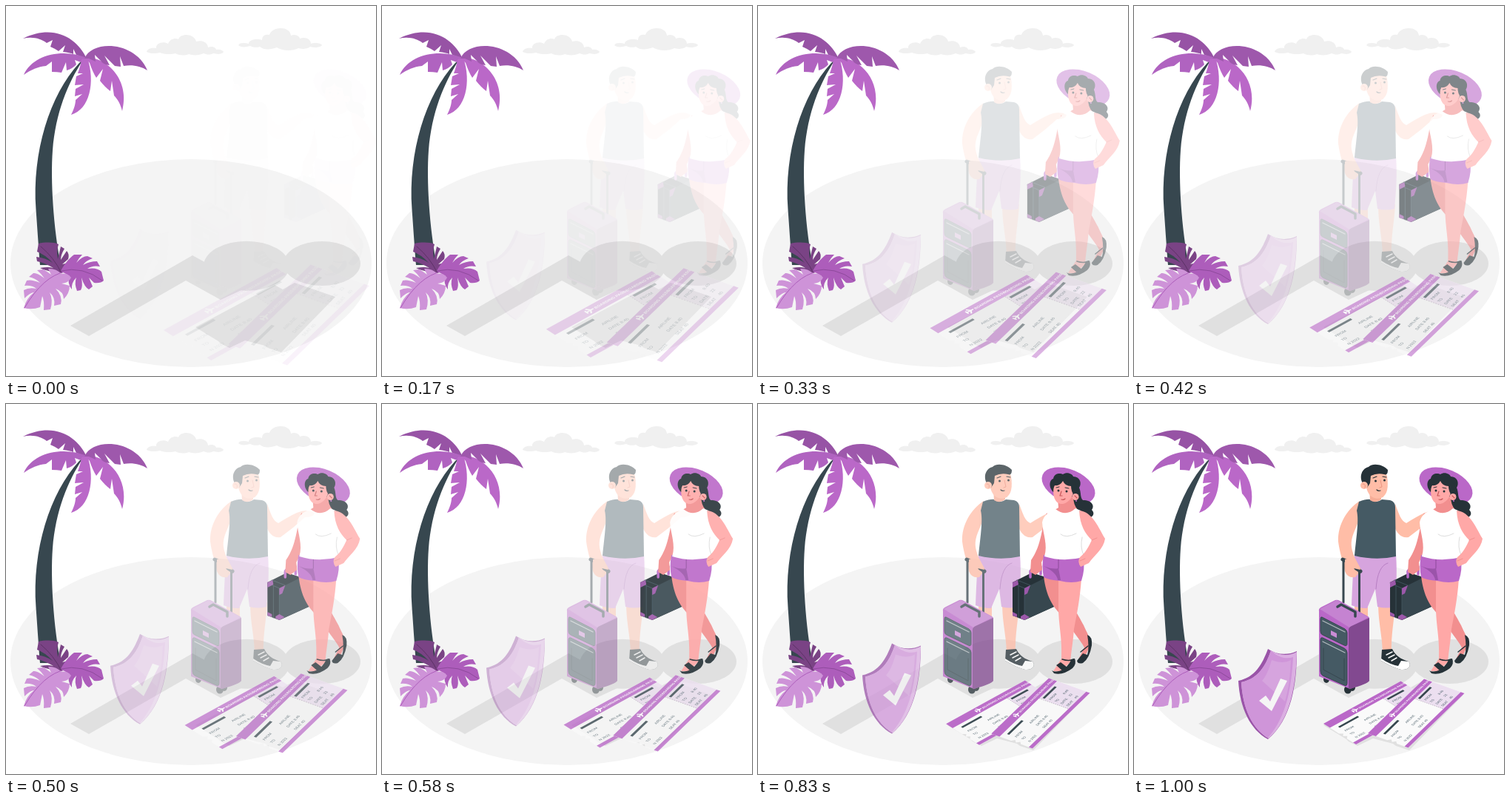
Write an HTML page that moves like this. It is 500 px wide and 500 px high and loops after 1.04 s.

```html
<!DOCTYPE html>
<html lang="en">
<head>
<meta charset="utf-8">
<title>Travel insurance</title>
<style>
html, body { margin: 0; width: 100%; height: 100%; overflow: hidden; background: #fff; }
svg { display: block; width: 100%; height: 100%; }
text { font-family: "Liberation Sans", Arial, sans-serif; }
.line { fill: none; stroke-linecap: round; stroke-linejoin: round; }
</style>
</head>
<body>
<svg viewBox="0 0 500 500">
<defs>
  <g id="ticket">
    <path fill="#fafafa" d="M0 0H100V50H0V36L3 33L0 30L3 27L0 24Z"/>
    <path fill="#ecdff0" d="M69 9H100V46H69Z"/>
    <path fill="#ba68c8" d="M0 0H100V10H0ZM0 45.5H100V50H0Z"/>
    <path class="line" stroke="#fff" stroke-width="1.3" d="M34 5H40M36 2L38 5L36 8M34 3.5V6.5"/>
    <g fill="#fff" font-size="3.5" font-weight="700">
      <text x="41.5" y="6.5">BOARDING PASS</text>
      <text x="71" y="6.5">BOARDING PASS</text>
    </g>
    <path stroke="#37474f" stroke-width="2.6" d="M7 15.5H32M71 14H92"/>
    <path stroke="#b0a4b4" stroke-width=".6" stroke-dasharray="1.2 1.2" d="M69 10V45"/>
    <g fill="#455a64" font-size="3.8">
      <text x="7" y="26">FROM</text><text x="32" y="26">AIRLINE</text>
      <text x="7" y="34">TO</text><text x="32" y="34">DATE 8:40</text>
      <text x="7" y="42">N 2022</text><text x="32" y="42">SEAT 40</text>
      <text x="72" y="22">FROM</text><text x="72" y="29">TO</text><text x="86" y="29">8:40</text>
      <text x="72" y="36">DATE</text><text x="86" y="36">22</text>
      <text x="72" y="43">SEAT</text><text x="86" y="43">40</text>
    </g>
  </g>
</defs>

<ellipse cx="250" cy="347.5" rx="244" ry="140.5" fill="#f4f4f4"/>
<g fill="#f0f0f0">
  <path d="M190 62C191 57 198 56 203 57C202 50 213 47 219 51C222 44 229 43 233 45C235 37 254 36 257 48C264 46 272 48 273 56C280 53 284 57 284 59C289 58 293 60 294 62C291 66 285 65 280 64C275 67 270 65 267 64C261 67 252 67 247 65C240 68 232 66 229 64C222 66 212 65 208 63C200 65 194 64 190 62Z"/>
  <path d="M314 53C316 49 323 50 328 51C328 45 340 44 346 46C346 39 352 38 356 39C360 27 384 27 385 40C391 37 397 41 397 44C405 41 412 45 412 51C417 49 426 50 427 53C425 56 417 57 411 55C406 59 398 58 395 57C388 61 374 61 366 56C358 59 349 60 343 55C337 57 332 55 330 54C323 56 317 56 314 53Z"/>
</g>
<g fill="#e0e0e0">
  <path d="M87 432L252 337L272 348L318 384L290 397L243 371L112 446Z"/>
  <ellipse cx="325" cy="351.3" rx="58" ry="33.5"/>
  <ellipse cx="427" cy="348" rx="52" ry="30"/>
  <path d="M256 434L363 377L374 383L390 374L445 393L372 468L354 462L350 459L323 452L302 462L290 456L287 453Z"/>
</g>

<g id="palm">
  <path fill="#37474f" d="M99 77C59 120 35 198 40.500 275C42 295 43 312 46 350L74 350C64 300 60 235 63 195C67 145 83 105 104 73Z"/>
  <path fill="#9753a5" d="M109 71C97 45 66 23 23 44C36 41 47 44 55 50L63 46L60 55Q67 58 71 61L80 53L77 62Q86 63 91 65L91 58L95 66Z"/>
  <path fill="#b063c0" d="M109 70C78 57 36 65 24 93C34 86 43 82 54 81L62 75L62 89Q69 89 75 90L81 76L82 87Q91 84 95 79L93 73L101 76Z"/>
  <path fill="#ba68c8" d="M106 69C138 69 168 101 157 142C155 133 151 126 146 121L143 101L141 115Q134 110 127 101L131 85L122 97Q117 89 113 77Z"/>
  <path fill="#ba68c8" d="M110 70C121 103 113 140 88 147C92 139 94 132 94 127L103 119L93 122L94 112L105 106L93 107L95 95L104 91L97 91Q101 80 102 72Z"/>
  <path fill="#9e58ac" d="M106 71C117 45 175 48 191 87C182 81 170 79 159 81L154 68L155 82L147 81L133 67L140 80Q132 80 127 73L120 66L121 75L112 71Z"/>
</g>
<g id="leaves">
  <path fill="#7a4385" d="M75 361C67 360 54 358 46 354Q57 352 64 354Q52 347 42 345L41 339Q53 340 63 347Q53 336 42 332L44 321C53 319 65 319 71 322Q68 330 70 342Q72 334 74 325L79 328Q74 336 74 343L82 331Q86 335 84 342L76 349L84 347Q82 356 75 361Z"/>
  <path class="line" stroke="#5d3266" d="M47 325Q65 340 75 361"/>
  <path fill="#ad5dbb" d="M74 358C78 350 85 341 92 336L103 336Q98 341 95 347Q103 338 110 338L117 341Q108 344 104 350Q113 345 123 345L127 352Q117 350 110 355Q123 353 129 359L132 371Q128 375 119 374L112 367L117 379L112 383Q106 380 102 367Q104 380 101 384L96 385Q92 375 95 367Q88 374 89 383Q82 374 86 365Z"/>
  <path class="line" stroke="#8e4a9c" d="M74 358Q104 351 130 371"/>
  <path fill="#ce93d8" d="M75 362Q67 354 57 355L61 363Q53 357 50 356L42 357Q48 362 52 368Q42 360 37 361L31 366Q40 368 46 374Q34 369 28 371L25 378Q35 377 41 382Q31 380 24 384L25 395Q33 387 38 387Q28 394 24 408Q35 411 46 407L49 392Q52 398 51 411L60 410Q64 397 59 387Q67 394 65 405L74 403Q77 392 67 382Q78 386 78 396Q86 388 86 378L75 375Q85 374 88 367Q82 360 75 362Z"/>
  <path class="line" stroke="#ad5dbb" d="M80 359Q50 365 25 408"/>
</g>

<g id="shield">
  <path fill="#9a54a8" d="M141 374C164 369 173 352 181 331C193 339 207 340 220 334C220 378 213 426 181 453C157 440 143 411 141 374Z"/>
  <path fill="#dbafe2" d="M145 376C168 371 178 354 185 333C196 340 209 341 220 335C219 378 212 426 182 452C160 439 147 412 145 376Z"/>
  <path fill="#cf95d9" d="M145 376C168 371 178 354 185 333C195 343 206 345 215 342C213 380 207 422 181 451C160 439 147 412 145 376Z"/>
  <path fill="#d6a4de" d="M186 346C196 350 205 350 212 346C211 367 209 386 204 402L173 374C180 366 183 356 186 346Z"/>
  <path fill="#f5f5f5" d="M169 401L178 394L184 402L198 371L207 374L186 415Z"/>
</g>

<g id="man">
  <path fill="#ffbda7" d="M298 260H316V300H298ZM330 268L353 268C352 292 347 311 348 337L336 339C336 314 330 297 330 268Z"/>
  <path fill="#263238" d="M335 332L349 331C353 340 361 345 371 348C376 354 370 360 361 359C349 356 340 350 334 347Z"/>
  <path fill="#fff" d="M361 347L371 348C376 354 370 360 361 359C349 356 340 350 334 347L334 344Q346 352 357 354Z"/>
  <path class="line" stroke="#fff" stroke-width="1.5" d="M341 339L349 335M344 343L352 339M348 347L355 343"/>
  <path fill="#d6a4de" d="M298 203H354C356 230 354 252 352 274Q341 277 329 274L326 250L315 276Q303 276 294 272C295 247 296 225 298 203Z"/>
  <path class="line" stroke="#b77fc3" d="M343 215Q329 219 327 250"/>
  <path fill="#ffbda7" d="M353 135C358 149 361 158 368 161Q382 152 393 147Q407 141 417 147Q416 153 404 153Q388 168 371 180C361 182 355 174 352 166Z"/>
  <path fill="#ffbda7" d="M305 131C288 142 275 163 276 186C278 202 283 214 285 226Q289 236 299 234L307 224L298 207C293 194 292 187 297 174L304 157Z"/>
  <path fill="#455a64" d="M304 132Q314 128 320 129Q327 135 335 129L346 130Q353 132 353 139L354 206Q327 212 298 205C301 176 304 157 301 144Z"/>
  <path fill="#f6ad97" d="M318 114H334V129Q327 135 319 130Z"/>
  <path fill="#ffbda7" d="M314 101C316 91 340 86 342 98C344 111 343 123 334 127C322 130 316 122 314 113Z"/>
  <path fill="#263238" d="M309 107C304 98 308 87 317 85C323 79 337 82 343 89Q343 97 338 95Q328 93 320 97L319 107L315 113Z"/>
  <circle cx="311" cy="110" r="5" fill="#ffbda7"/>
  <path class="line" stroke="#eb9481" d="M309 108Q314 108 312 113M333 103L335 112L332 113"/>
  <g fill="#263238"><circle cx="326.5" cy="104" r="1.5"/><circle cx="338.5" cy="103" r="1.5"/></g>
  <path class="line" stroke="#263238" stroke-width="1.2" d="M323 100L328 98M336 98L341 99M328 116Q330 118 333 117"/>

  <path class="line" stroke="#37474f" stroke-width="3" d="M283 212V268M304.500 224V286"/>
  <path class="line" stroke="#37474f" stroke-width="5" d="M282 210L289 213M300 222L306 226"/>
  <path fill="#ffbda7" d="M285 210L296 207L304 219L306 224L297 222L300 233Q288 235 285 222Z"/>
  <g fill="#263238">
    <ellipse cx="260" cy="372" rx="4" ry="5"/><ellipse cx="289" cy="386" rx="5" ry="5.500"/><ellipse cx="295" cy="383" rx="4" ry="5"/>
  </g>
  <path fill="#ba68c8" d="M250 280Q249 276 254 274L272 265Q275 264 278 266L316 287Q318 288 318 290V374L292 385L250 368Z"/>
  <path fill="#c583d1" d="M251 277L274 265L317 288L291 302Z"/>
  <path fill="#824990" d="M290 305Q290 302 294 300L318 289V374Q316 378 292 385Q289 386 290 381Z"/>
  <path fill="#455a64" stroke="#37474f" d="M254 288L285 304Q288 306 288 309V324Q288 328 284 326L255 312Q252 311 252 307V291Q252 287 254 288ZM255 316L284 330Q288 332 288 336V377Q288 382 284 380L255 367Q252 365 252 361V319Q252 315 255 316Z"/>
  <path class="line" stroke="#b4bcc0" stroke-width="1.200" d="M255 293L285 308M255 321L285 336"/>
  <path fill="#ca8cd5" d="M266 306L274 310V316L266 312Z"/>
  <path class="line" stroke="#37474f" d="M256 330V359L284 374V344"/>
  <path class="line" stroke="#37474f" stroke-width="3.500" d="M275 274L280 271L299 281V287"/>
</g>

<g id="woman">
  <path fill="#263238" d="M346 241L372 228L391 234L404 273L362 292L346 286Z"/>
  <path fill="#37474f" d="M362 249L390 235L404 273L362 292Z"/>
  <path class="line" stroke="#455a64" stroke-width=".800" d="M346 242L362 249V291M354 246V289M352 238L370 245"/>
  <path fill="#9c58aa" d="M346 241L353 238L354 244L346 248ZM362 249L370 245L366 256L362 258ZM346 281L352 284V288L346 286ZM362 284L369 288L362 292L357 290V287Z"/>
  <path class="line" stroke="#ba68c8" stroke-width="3.500" d="M370 234V226Q371 222 384 220V230"/>
  <path fill="#f28f8f" d="M392 147C385 165 386 190 371 211L370 227L377 231L386 224L385 214C395 196 399 178 399 160Z"/>

  <path fill="#f28f8f" d="M388 232L416 238C421 266 434 283 442 299C446 309 452 316 451 326L442 345L435 345L443 329C437 318 426 306 415 288C400 275 391 259 388 232Z"/>
  <path fill="#263238" d="M447 312Q454 314 453 326Q450 344 441 350Q434 352 433 347L441 337L447 339Q450 329 447 312Z"/>
  <path fill="#ffa8a7" d="M408 236H439C437 264 433 283 429 304C428 320 425 335 424 349L411 361L401 361L412 344C413 316 409 304 408 279Z"/>
  <path fill="#263238" d="M399 360Q404 364 416 358Q425 349 425 345L430 344Q433 351 427 357Q414 367 402 364ZM405 353L411 349L420 356L414 361Z"/>
  <path class="line" stroke="#263238" stroke-width="1.500" d="M413 345Q422 348 429 345M438 335L448 327"/>
  <path fill="#ba68c8" d="M388 204L442 207Q444 224 439 239Q426 243 410 239Q395 238 388 234Q385 219 388 204Z"/>
  <path fill="#9b54aa" d="M388 219Q400 224 408 222L411 238L407 238Q406 228 388 219Z"/>
  <path class="line" stroke="#8d4b9a" d="M408 207V222"/>

  <ellipse cx="421.500" cy="110.500" rx="38" ry="22" fill="#ba68c8" transform="rotate(23 421.500 110.500)"/>
  <path fill="#263238" d="M401 119C394 112 396 102 401 101C402 93 411 93 414 95C420 91 427 95 428 98C437 98 440 107 436 113C439 120 437 126 441 130C454 130 457 138 453 143C458 148 455 154 445 155C437 152 437 144 430 139L418 118Z"/>
  <path fill="#f28f8f" d="M407 128L428 125Q428 136 434 143L414 150L400 145L408 140Z"/>
  <path fill="#ffa8a7" d="M402 111C406 99 425 99 428 112C430 123 423 133 414 135C404 136 399 125 402 111Z"/>
  <path fill="#263238" d="M401 114C396 104 405 96 414 98C427 96 435 107 432 119L429 123Q425 118 425 111Q417 111 414 104Q410 111 403 110Z"/>
  <circle cx="431" cy="125.500" r="4.500" fill="#ffa8a7"/>
  <g fill="#263238"><circle cx="408" cy="117" r="1.500"/><circle cx="419" cy="118" r="1.500"/></g>
  <path class="line" stroke="#263238" d="M405 113L409 112M417 113L422 114"/>
  <path class="line" stroke="#c7595b" stroke-width="1.200" d="M412 118L410 124L413 124M412 129Q415 130 417 128M430 124L433 127"/>
  <circle cx="432" cy="131" r="1" fill="#ba68c8"/>
  <path fill="#fff" d="M404 142Q418 153 431 141L438 144C443 156 437 169 440 180Q443 196 442 207Q414 214 389 206C394 190 387 176 386 160Q388 148 404 142Z"/>
  <path class="line" stroke="#dcdcdc" d="M411 176Q418 182 432 175M440 180Q437 194 442 204"/>
  <path fill="#ffa8a7" d="M436 144C454 145 463 169 471 182C469 196 456 205 449 215L438 220Q433 213 437 207C445 201 449 192 453 184C444 175 437 164 436 144Z"/>
  <path class="line" stroke="#f28f8f" d="M453 184L460 181M437 212L444 209"/>
</g>

<g id="tickets">
  <use href="#ticket" transform="matrix(1.045 -.575 .88 .56 256 432)"/>
  <use href="#ticket" transform="matrix(.76 -.735 1.09 .39 316 445)"/>
</g>
</svg>
<script>
const LOOP = 1040, FPS = 24;
const [shield, man, woman, tickets] =
  ["shield", "man", "woman", "tickets"].map(id => document.getElementById(id));

// CSS-style cubic-bezier easing, solved by bisection
function bezier(x1, y1, x2, y2) {
  const at = (a, b, s) => 3 * (1 - s) * (1 - s) * s * a + 3 * (1 - s) * s * s * b + s * s * s;
  return t => {
    if (t >= 1) return 1;
    let lo = 0, hi = 1;
    for (let i = 0; i < 24; i++) {
      const mid = (lo + hi) / 2;
      if (at(x1, x2, mid) < t) lo = mid; else hi = mid;
    }
    return at(y1, y2, lo);
  };
}
const easeIn = bezier(.42, 0, 1, 1);
const easeOut = bezier(0, 0, .58, 1);
const overshoot = bezier(.36, -.01, .5, 1.38);

function pose(node, opacity, transform) {
  node.setAttribute("opacity", Math.max(0, Math.min(1, opacity)).toFixed(4));
  if (transform) node.setAttribute("transform", transform);
}

function draw(ms) {
  // the motion runs in steps of 1/24 s
  const step = Math.max(1, Math.floor((ms % LOOP + 4) * FPS / 1000));
  const t = Math.min(1, step / FPS + .006);
  const slow = easeIn(t), fast = easeOut(t), swing = overshoot(t);
  pose(man, slow);
  pose(shield, slow, `translate(0 ${-30 * (1 - slow)})`);
  pose(woman, swing, `translate(${30 * (1 - swing)} 0)`);
  pose(tickets, fast, `translate(349.5 419) scale(${1.5 - .5 * fast}) translate(-349.5 -419)`);
}

const start = performance.now();
function tick() {
  draw(performance.now() - start);
  requestAnimationFrame(tick);
}
tick();
</script>
</body>
</html>
```
